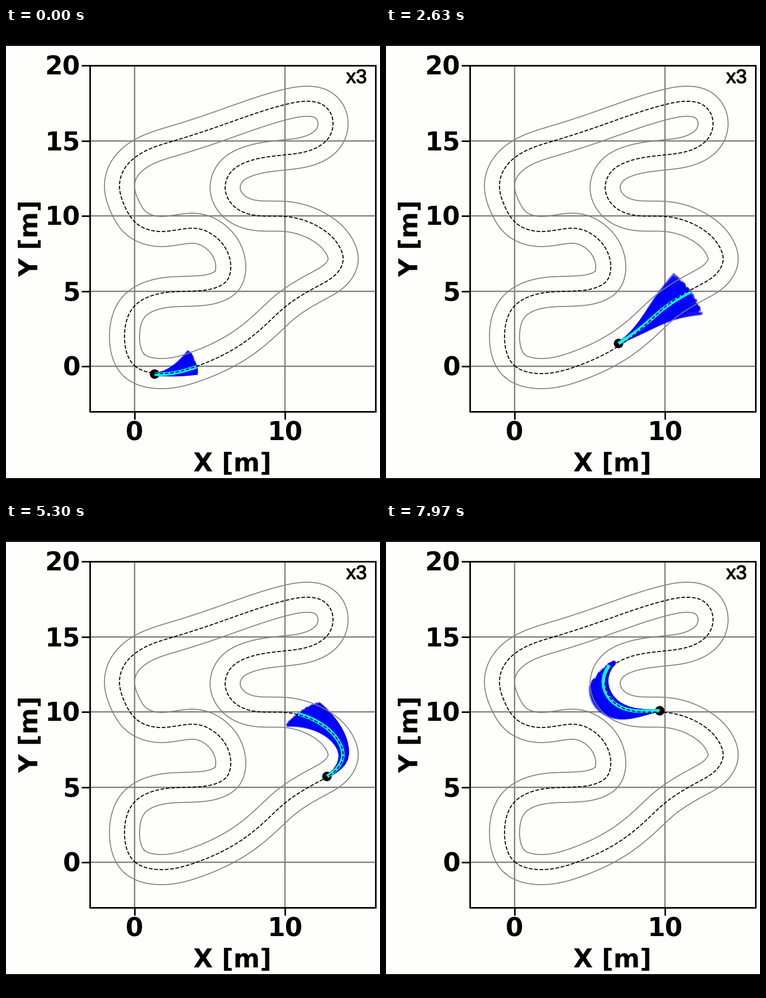
These frames come from a looping animation (669x837 px, 8000 ms). A matplotlib script:

```python
import numpy as np
import matplotlib.pyplot as plt
from matplotlib.animation import FuncAnimation
from matplotlib.collections import LineCollection
from matplotlib.patches import Circle, Rectangle
from matplotlib.patheffects import withStroke

W, H, DPI = 669, 837, 96
FRAMES, LOOP = 240, 8000
PT = 72 / DPI            # points per pixel
UNIT = 26.9              # pixels per metre, also half the track width
X0, Y0 = 230, 605        # pixel of the plot origin
LEFT, RIGHT, TOP, BOTTOM = 149.5, 661, 67, 686

# Waypoints of the centre line, in driving order
WAYPOINTS = np.array([
    230 + 604j, 273 + 618j, 341 + 605j, 419 + 567j, 462 + 533j, 499 + 499j,
    559 + 461j, 594 + 436j, 603 + 415j, 597 + 392j, 560 + 356j, 499 + 337j,
    445 + 335j, 408 + 319j, 392 + 287j, 402 + 258j, 432 + 239j, 499 + 227j,
    564 + 209j, 578 + 195j, 585 + 172j, 581 + 153j, 566 + 137j, 539 + 131j,
    499 + 137j, 380 + 176j, 303 + 201j, 230 + 232j, 210 + 255j, 203 + 281j,
    212 + 318j, 234 + 350j, 278 + 364j, 344 + 359j, 384 + 382j, 402 + 430j,
    395 + 452j, 379 + 463j, 345 + 470j, 270 + 476j, 230 + 497j, 212 + 550j])

# Time, vehicle, end of the planned path, fan spread to the left and right
KEYS = [
    (0.00, 266 + 619j, 341 + 606j, .40, .17),
    (1.13, 318.5 + 604j, 431 + 560j, .29, .37),
    (2.63, 418 + 563j, 546 + 471j, .28, .27),
    (3.80, 484 + 511j, 605 + 412j, .32, .28),
    (4.47, 524 + 482j, 577 + 367j, .17, .36),
    (6.10, 600 + 407.5j, 467 + 335j, .29, .28),
    (7.97, 489.5 + 334j, 400 + 252j, .38, .11)]


def hermite(x, t, p, m):
    i = np.clip(np.searchsorted(t, x, side="right") - 1, 0, len(t) - 2)
    h = t[i + 1] - t[i]
    u = (x - t[i]) / h
    return ((1 + 2 * u) * (1 - u) ** 2 * p[i] + u * (1 - u) ** 2 * h * m[i]
            + u * u * (3 - 2 * u) * p[i + 1] + u * u * (u - 1) * h * m[i + 1])


def closed_spline(p):
    """Smooth closed curve through p, sampled about every pixel."""
    n = len(p)
    step = np.roll(p, -1) - p
    h = np.abs(step)
    w, wp = 1 / h, 1 / np.roll(h, 1)
    eye = np.eye(n)
    a = (np.diag(2 * (w + wp)) + w[:, None] * np.roll(eye, 1, axis=1)
         + wp[:, None] * np.roll(eye, -1, axis=1))
    m = np.linalg.solve(a, 3 * (step / h * w + np.roll(step / h, 1) * wp))
    t = np.concatenate([[0], np.cumsum(h)])
    z = hermite(np.linspace(0, t[-1], 6000), t, np.append(p, p[0]), np.append(m, m[0]))
    s = np.concatenate([[0], np.cumsum(np.abs(np.diff(z)))])
    return np.interp(np.arange(0, s[-1], 1.0), s, z)


centre = closed_spline(WAYPOINTS)
N = len(centre)
S = np.arange(N)
tangent = np.roll(centre, -1) - np.roll(centre, 1)
normal = 1j * tangent / np.abs(tangent)


def border(side):
    """Offset curve without the loops that form inside tight bends."""
    z = centre + side * UNIT * normal
    gap = np.abs(S[:, None] - S)
    near = np.minimum(gap, N - gap) < 120
    dist = np.where(near, np.abs(z[:, None] - centre), 1e9).min(axis=1)
    z = z[dist > UNIT - 0.3]
    return np.append(z, z[0])


def project(points):
    s = np.array([np.argmin(np.abs(centre - p)) for p in points])
    off = ((np.array(points) - centre[s]) * normal[s].conj()).real
    return s.astype(float), off


key_t, key_car, key_end, key_left, key_right = (np.array(c) for c in zip(*KEYS))
car_s, car_off = project(key_car)
end_s, end_off = project(key_end)
car_v = np.gradient(car_s, key_t, edge_order=2)
end_v = np.gradient(end_s, key_t, edge_order=2)

U = np.linspace(0, 1, 18)
MID = (U[1:] + U[:-1]) / 2
BEND = 0.4               # how quickly the fan opens along the plan


def plan(t):
    s0 = hermite(t, key_t, car_s, car_v)
    s1 = hermite(t, key_t, end_s, end_v)
    s = s0 + (s1 - s0) * U
    off = np.interp(t, key_t, car_off) * (1 - U) ** 2 + np.interp(t, key_t, end_off) * U ** 2
    return np.interp(s, S, centre) + off * np.interp(s, S, normal)


def rollouts(path, t, rng):
    a = np.concatenate([np.linspace(-.93, .93, 75), rng.uniform(-.93, .93, 35),
                        rng.choice([-1, 1], 4) * rng.uniform(.95, 1.08, 4)])
    spread = np.where(a < 0, np.interp(t, key_t, key_left), np.interp(t, key_t, key_right))
    turn = ((1 + BEND) * a * spread)[:, None] * MID ** BEND
    scale = rng.uniform(.98, 1.02, len(a))[:, None]
    z = path[0] + np.cumsum(np.diff(path) * np.exp(1j * turn) * scale, axis=1)
    z = np.insert(z, 0, path[0], axis=1)
    return np.stack([z.real, z.imag], axis=-1)


fig = plt.figure(figsize=(W / DPI, H / DPI), dpi=DPI, facecolor="#fefefc")
ax = fig.add_axes([0, 0, 1, 1])
ax.set_xlim(0, W)
ax.set_ylim(H, 0)
ax.axis("off")


def line(z, color, width, z_order, **kw):
    z = np.asarray(z)
    return ax.plot(z.real, z.imag, color=color, lw=width * PT, zorder=z_order, **kw)[0]


def label(x, y, s, size=45.5, weight="bold", font="DejaVu Sans", **kw):
    ax.text(x, y, s, fontsize=size * PT, weight=weight, family=font, va="baseline", **kw)


for y, h in ((0, 32), (805, 32)):
    ax.add_patch(Rectangle((0, y), W, h, fc="black", lw=0))

for v in range(0, 21, 5):
    y = Y0 - v * UNIT
    if v < 20:
        line([LEFT + y * 1j, RIGHT + y * 1j], "#808080", 2.4, 1)
    line([135 + y * 1j, LEFT + y * 1j], "black", 2.8, 6, solid_capstyle="butt")
    label(133, y + 16.7, str(v), ha="right")
for v in (0, 10):
    x = X0 + v * UNIT
    line([x + TOP * 1j, x + BOTTOM * 1j], "#808080", 2.4, 1)
    line([x + BOTTOM * 1j, x + 700j], "black", 2.8, 6, solid_capstyle="butt")
    label(x, 737.5, str(v), ha="center")
ax.add_patch(Rectangle((LEFT, TOP), RIGHT - LEFT, BOTTOM - TOP, fill=False,
                       ec="black", lw=2.8 * PT, zorder=6))
label(404.5, 793, "X [m]", ha="center")
label(57, 376, "Y [m]", ha="center", rotation=90, rotation_mode="anchor")
label(608.5, 98.5, "x3", size=35, weight="normal", font="Liberation Sans",
      path_effects=[withStroke(linewidth=1.2 * PT, foreground="black")])

for side in (-1, 1):
    line(border(side), "#808080", 1.7, 4)
line(np.append(centre, centre[0]), "black", 1.8, 5, dashes=(3.7, 1.6))

fan = LineCollection([], colors=[(0, 0, 1, .5)], linewidths=4.6 * PT, zorder=2)
ax.add_collection(fan)
dot = ax.add_patch(Circle((0, 0), 8.5, fc="black", lw=0, zorder=3))
best = line([0j], "cyan", 6.2, 3.5, solid_capstyle="butt")


def update(i):
    t = i * LOOP / FRAMES / 1000
    path = plan(t)
    fan.set_segments(rollouts(path, t, np.random.default_rng(i)))
    dot.center = path[0].real, path[0].imag
    best.set_data(path.real, path.imag)
    return fan, dot, best


anim = FuncAnimation(fig, update, frames=FRAMES, interval=LOOP / FRAMES,
                     repeat=True, repeat_delay=0, blit=False)
plt.show()
```
